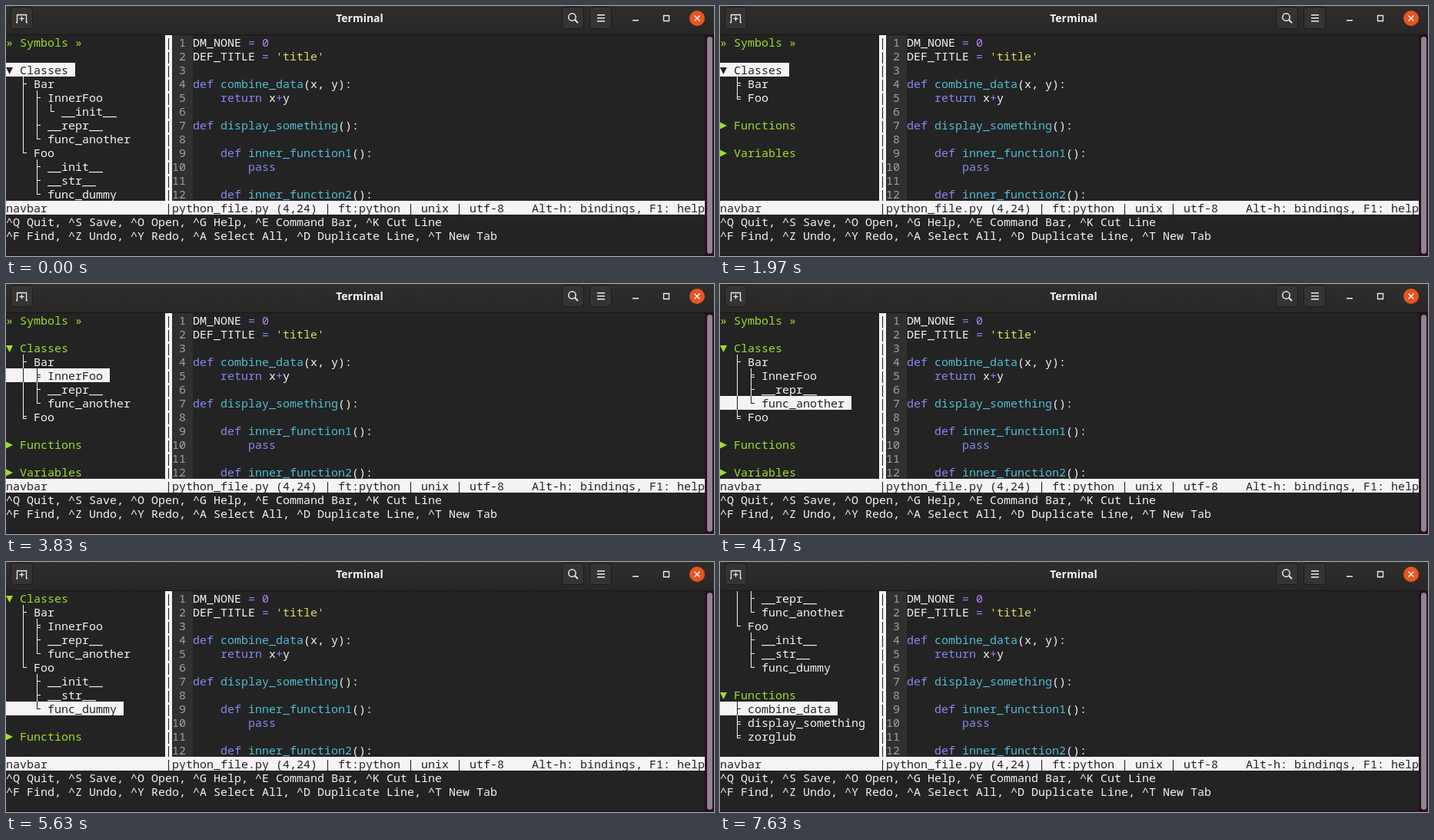
Recreate the animation shown at these times as an HTML page with a canvas. Size 921 by 326 pixels, loop 8000 ms.

```html
<!DOCTYPE html>
<html lang="en">
<head>
<meta charset="utf-8">
<title>Terminal</title>
<style>
  html, body { margin: 0; width: 100%; height: 100%; overflow: hidden; background: #232323; }
  canvas { display: block; }
</style>
</head>
<body>
<canvas id="stage" width="921" height="326"></canvas>
<script>
const ctx = document.getElementById('stage').getContext('2d');
const CELL = 9, ROW = 18, TOP = 38, ROWS = 12, LOOP = 8000;
const BG = '#232323', FG = '#f2f2f2', LIGHT = '#f5f3f5', GREEN = '#a0dc28';
const KEYWORD = '#8787f0', STRING = '#e0d868', NUMBER = '#b083f0', NAME = '#50bcd4';

const tree = [
  ['Classes', [
    ['Bar', [['InnerFoo', [['__init__']]], ['__repr__'], ['func_another']]],
    ['Foo', [['__init__'], ['__str__'], ['func_dummy']]]]],
  ['Functions', [
    ['combine_data'],
    ['display_something', [['inner_function1'], ['inner_function2']]],
    ['zorglub', [['inner']]]]],
  ['Variables', [['DM_NONE'], ['DEF_TITLE']]]
];

// start time, selected row, open nodes
const steps = [
  [0, 2, 'Classes Bar InnerFoo Foo'],
  [500, 2, ''],
  [1970, 2, 'Classes'],
  [2970, 3, 'Classes'],
  [3500, 3, 'Classes Bar'],
  [3830, 4, 'Classes Bar'],
  [4030, 5, 'Classes Bar'],
  [4170, 6, 'Classes Bar'],
  [4500, 7, 'Classes Bar'],
  [5030, 7, 'Classes Bar Foo'],
  [5430, 8, 'Classes Bar Foo'],
  [5530, 9, 'Classes Bar Foo'],
  [5630, 10, 'Classes Bar Foo'],
  [6230, 11, 'Classes Bar Foo'],
  [6430, 12, 'Classes Bar Foo'],
  [7500, 12, 'Classes Bar Foo Functions'],
  [7630, 13, 'Classes Bar Foo Functions']
];

const code = `DM_NONE = 0
DEF_TITLE = 'title'

def combine_data(x, y):
    return x+y

def display_something():

    def inner_function1():
        pass

    def inner_function2():`.split('\n');

function rect(x, y, w, h, color) {
  ctx.fillStyle = color;
  ctx.fillRect(x, y, w, h);
}

function roundRect(x, y, w, h, r, fill, stroke) {
  ctx.beginPath();
  ctx.roundRect(x, y, w, h, r);
  if (fill) { ctx.fillStyle = fill; ctx.fill(); }
  if (stroke) { ctx.strokeStyle = stroke; ctx.stroke(); }
}

function line(color, width, ...points) {
  ctx.strokeStyle = color;
  ctx.lineWidth = width;
  ctx.beginPath();
  for (let i = 0; i < points.length; i += 2) ctx.lineTo(points[i], points[i + 1]);
  ctx.stroke();
}

function text(str, col, row, color) {
  ctx.font = '15px "Noto Sans Mono", monospace';
  ctx.fillStyle = color;
  ctx.fillText(str, col * CELL, TOP + row * ROW + 15);
}

// Box-drawing characters and triangles, drawn to fill their cells
function symbol(ch, col, row, color) {
  const x = col * CELL, y = TOP + row * ROW, mid = y + 9;
  ctx.fillStyle = color;
  if ('▼►'.includes(ch)) {
    ctx.beginPath();
    const p = ch === '▼' ? [0, 6, 9, 6, 4.5, 15] : [0, 5.5, 9, 10, 0, 14.5];
    for (let i = 0; i < 6; i += 2) ctx.lineTo(x + p[i], y + p[i + 1]);
    ctx.fill();
    return;
  }
  const height = { '└': 10, '╘': 12 }[ch] || ROW;
  ctx.fillRect(x + 4, y, 1, height);
  if ('├└'.includes(ch)) ctx.fillRect(x + 4, mid, 5, 1);
  if ('╞╘'.includes(ch)) {
    ctx.fillRect(x + 4, mid - 1, 5, 1);
    ctx.fillRect(x + 4, mid + 2 - 1 + 1, 5, 1);
  }
}

function treeRows(open) {
  const rows = ['» Symbols »', ''];
  const addKids = (nodes, indent) => nodes.forEach(([name, kids], i) => {
    const last = i === nodes.length - 1, expanded = open.includes(name);
    const branch = kids && !expanded ? '╞╘' : '├└';
    rows.push(indent + branch[+last] + ' ' + name);
    if (kids && expanded) addKids(kids, indent + (last ? '  ' : '│ '));
  });
  for (const [name, kids] of tree) {
    const expanded = open.includes(name);
    rows.push((expanded ? '▼ ' : '► ') + name);
    if (expanded) addKids(kids, '  ');
    rows.push('');
  }
  return rows;
}

function drawTree(selected, open) {
  const scroll = Math.max(0, selected - 8);
  treeRows(open.split(' ')).slice(scroll, scroll + ROWS).forEach((str, row) => {
    const isSelected = row + scroll === selected;
    if (isSelected) rect(0, TOP + row * ROW, (str.length + 1) * CELL, ROW, LIGHT);
    const color = isSelected ? BG : /^[»▼►]/.test(str) ? GREEN : FG;
    const [, lead, label] = str.match(/^([ │├└╞╘▼►]*)(.*)$/);
    [...lead].forEach((ch, col) => ch !== ' ' && symbol(ch, col, row, color));
    text(label, lead.length, row, color);
  });
}

function drawCode() {
  const token = /(\b(?:def|return|pass)\b|[=+])|('.*?')|(\b\d+\b)|(\w+(?=\())|\w+|./g;
  const colors = [KEYWORD, STRING, NUMBER, NAME];
  rect(24 * CELL, TOP, 3 * CELL, ROWS * ROW, '#303030');
  rect(23 * CELL, TOP, CELL, ROWS * ROW, LIGHT);
  code.forEach((str, row) => {
    text('|', 23, row, BG);
    text(String(row + 1).padStart(2), 24, row, '#a0a0a0');
    for (const m of str.matchAll(token)) {
      const kind = m.slice(1).findIndex(Boolean);
      text(m[0], 27 + m.index, row, colors[kind] || FG);
    }
  });
}

function drawFooter() {
  rect(0, TOP + ROWS * ROW, 909, ROW, LIGHT);
  text('navbar', 0, 12, BG);
  text('|python_file.py (4,24) | ft:python | unix | utf-8    Alt-h: bindings, F1: help', 23, 12, BG);
  text('^Q Quit, ^S Save, ^O Open, ^G Help, ^E Command Bar, ^K Cut Line', 0, 13, FG);
  text('^F Find, ^Z Undo, ^Y Redo, ^A Select All, ^D Duplicate Line, ^T New Tab', 0, 14, FG);
}

function drawWindow() {
  rect(0, 0, 921, 326, BG);
  rect(909, TOP, 12, 288, '#2c0c22');
  rect(0, 325, 921, 1, '#2c0c22');
  roundRect(912, 40, 7, 283, 3.5, '#8c868b');

  const bar = ctx.createLinearGradient(0, 0, 0, 37);
  bar.addColorStop(0, '#302e2d');
  bar.addColorStop(1, '#292726');
  rect(0, 0, 921, 37, bar);
  rect(0, 37, 921, 1, '#171616');
  ctx.lineWidth = 1;
  for (const x of [6.5, 723.5, 759.5]) roundRect(x, 1.5, 28, 28, 4, '#363433', '#1b1a1a');

  const ink = '#eeeeec';
  line(ink, 1.3, 13, 21.5, 14.5, 21.5, 14.5, 11.5, 26.5, 11.5, 26.5, 21.5, 28, 21.5);
  line(ink, 1.3, 20.5, 13.5, 20.5, 19.5);
  line(ink, 1.3, 17.5, 16.5, 23.5, 16.5);
  ctx.lineWidth = 1.5;
  ctx.beginPath();
  ctx.arc(736.5, 14.5, 4.7, 0, 7);
  ctx.stroke();
  line(ink, 1.8, 740, 18, 744, 22);
  for (const y of [11, 15, 19]) rect(769, y, 10, 1.5, ink);
  rect(815, 18, 8, 1.5, ink);
  ctx.lineWidth = 1.3;
  roundRect(855.5, 12.5, 7, 7, 0, null, ink);

  roundRect(889, 6, 20, 20, 10, '#e95420');
  line('#fff', 1.4, 895.5, 12.5, 902.5, 19.5);
  line('#fff', 1.4, 902.5, 12.5, 895.5, 19.5);

  ctx.font = 'bold 14px "Noto Sans", sans-serif';
  ctx.fillStyle = '#f4f4f2';
  ctx.textAlign = 'center';
  ctx.fillText('Terminal', 460, 21);
  ctx.textAlign = 'left';
}

function frame(now) {
  const time = now % LOOP;
  const [, selected, open] = steps.findLast(([start]) => start <= time) || steps[0];
  drawWindow();
  drawTree(selected, open);
  drawCode();
  drawFooter();
  requestAnimationFrame(frame);
}
requestAnimationFrame(frame);
</script>
</body>
</html>
```
